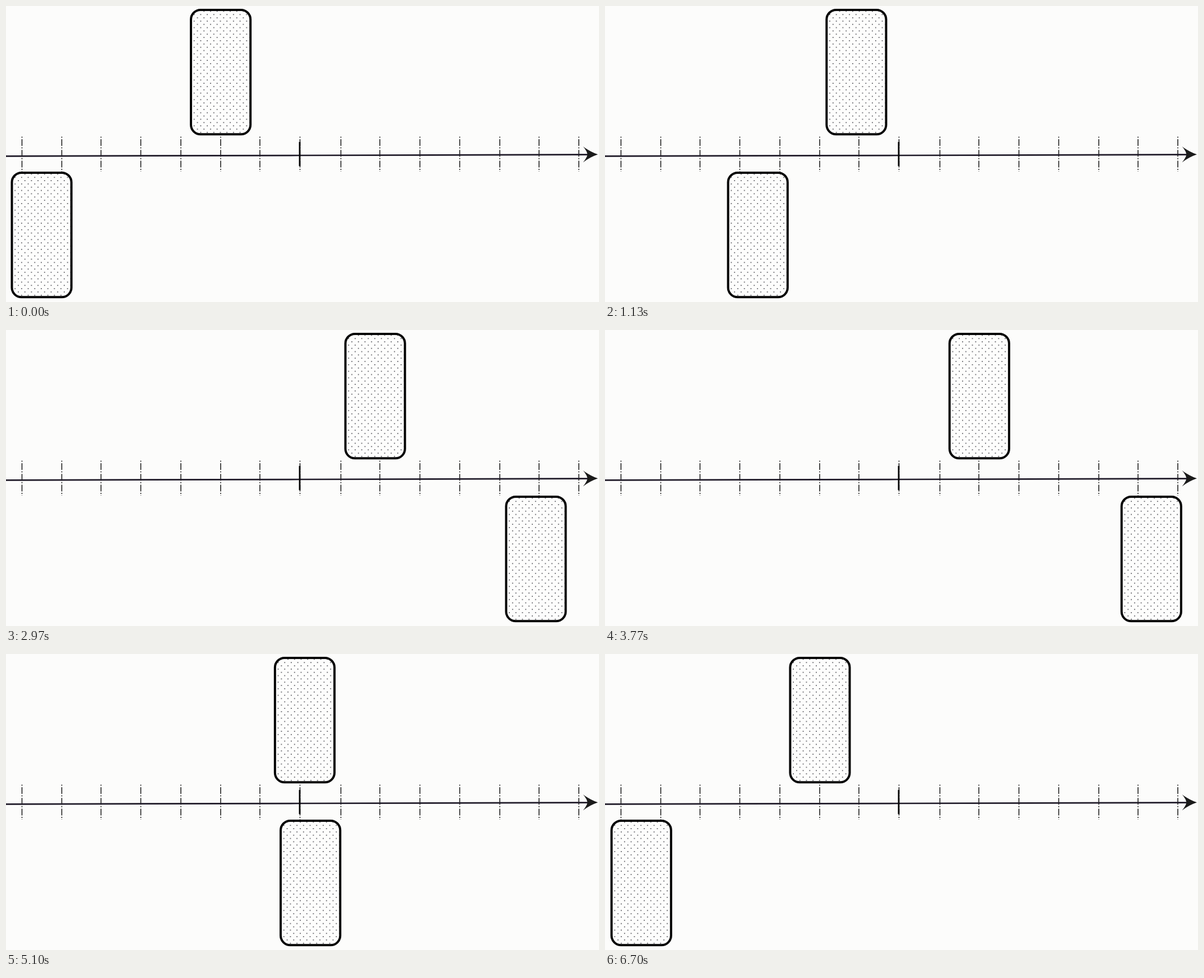
Recreate the animation shown at these times as an HTML page. Size 1058 by 529 pixels, loop 6.73 s.

```html
<!DOCTYPE html>
<html lang="en">
<head>
<meta charset="utf-8">
<title>Two blocks along an axis</title>
<style>
  html, body { margin: 0; width: 100%; height: 100%; overflow: hidden; background: #fcfcfb; }
  svg { display: block; width: 100%; height: 100%; }
  .block { fill: url(#dots); stroke: #050505; stroke-width: 4; }
  .tick { stroke: #111; stroke-width: 1.5; stroke-dasharray: 12 2.6 2 2.6; stroke-dashoffset: 14.2; }
</style>
</head>
<body>
<svg viewBox="0 0 1058 529">
  <defs>
    <pattern id="dots" x="-44.9" y="6.4" width="11.7" height="11.7" patternUnits="userSpaceOnUse">
      <rect width="11.7" height="11.7" fill="#fdfdfc"/>
      <path d="M2 3h1.9M7.85 8.85h1.9" stroke="#202028" stroke-width="1.3"/>
    </pattern>
  </defs>
  <g id="ticks"></g>
  <path d="M0 268.4L524 267L1041 265.6" stroke="#1f1a28" stroke-width="2.7" fill="none"/>
  <path d="M524 243V286" stroke="#050505" stroke-width="2.8"/>
  <path d="M1056 265.3Q1042 270 1029.5 279.5Q1036 272 1037.5 265.3Q1036 258 1029.5 251Q1042 260.5 1056 265.3Z" fill="#1b1b1b"/>
  <rect class="block" id="upper" x="-53.5" y="7" width="106.2" height="222.3" rx="17"/>
  <rect class="block" id="lower" x="-53.5" y="7" width="106.2" height="222.3" rx="17"/>
</svg>
<script>
const LOOP = 6730, FRAMES = 202;
const tickX = [28.5, 99.5, 169.5, 240.5, 312, 383, 453, 524.5, 597.5, 667, 738.5, 809.5, 881, 951, 1022];
const byId = id => document.getElementById(id);
const upper = byId("upper"), lower = byId("lower");

byId("ticks").innerHTML = tickX
  .map(x => `<path class="tick" d="M${x} 233V296"/>`).join("");

// Steps last 30, 40 and 30 ms in turn.
function stepAt(ms) {
  const rest = ms % 100;
  return 3 * Math.floor(ms / 100) + (rest < 30 ? 0 : rest < 70 ? 1 : 2);
}

// Near-harmonic swing with a slight second harmonic.
function swing(a) {
  return 529.1 - 464.1 * Math.cos(a) - 35.4 * Math.sin(a)
    + 2.6 * Math.sin(2 * a) - Math.cos(2 * a);
}

function place(el, x, y) {
  el.setAttribute("transform", `translate(${x.toFixed(2)} ${y})`);
}

function draw(ms) {
  const x = swing(2 * Math.PI * stepAt(ms % LOOP) / FRAMES);
  place(lower, x, 291);
  place(upper, 383.5 + 0.3125 * (x - 64), 0);
}

const start = performance.now();
function tick() {
  draw(performance.now() - start);
  requestAnimationFrame(tick);
}
tick();
</script>
</body>
</html>
```
